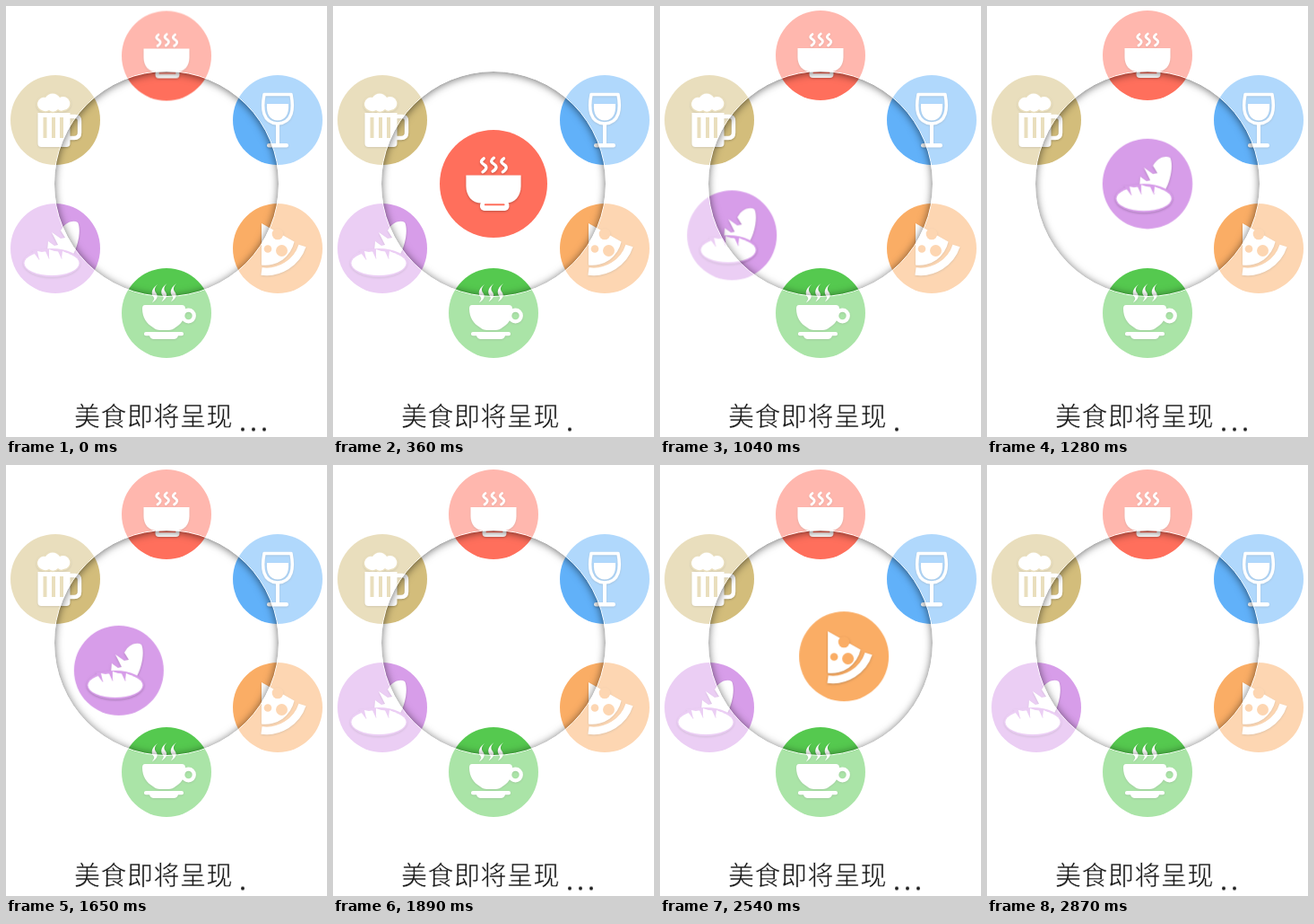
Write an HTML page that moves like this. It is 358 px wide and 480 px high and loops after 2.94 s.

```html
<!DOCTYPE html>
<html lang="zh-CN">
<head>
<meta charset="utf-8">
<title>Loading</title>
<style>
  html, body { margin: 0; width: 100%; height: 100%; overflow: hidden; background: #fff; }
  body { position: relative; }
  body > svg { position: absolute; left: 0; top: 0; }

  .plate { fill: currentColor; }
  .icon { fill: #fff; stroke: none; filter: drop-shadow(0 1px 1px rgba(0, 0, 0, .22)); }
  .cut { fill: currentColor; }
  .gap { stroke: currentColor; stroke-width: 3; paint-order: stroke; }
  .line { fill: none; stroke: #fff; stroke-linecap: round; stroke-linejoin: round; }

  /* home -> centre, swell, back home */
  .move { animation: visit 2940ms linear infinite; }
  @keyframes visit {
    0%, 30.85%, 100% { transform: translate(0, 0) scale(1); }
    10.2%, 16.8% { transform: translate(var(--dx), var(--dy)) scale(1); }
    12.2%, 14.9% { transform: translate(var(--dx), var(--dy)) scale(1.2); }
  }
  .soup { --dx: 0px; --dy: 143px; }
  .bread { --dx: 124px; --dy: -72px; animation-delay: 980ms; }
  .pizza { --dx: -124px; --dy: -72px; animation-delay: 1960ms; }

  /* the spread veils everything outside the ring */
  .ring {
    position: absolute; left: 53px; top: 72px; width: 252px; height: 252px;
    box-sizing: border-box; border: 1.5px solid #fff; border-radius: 50%;
    box-shadow: 0 0 0 400px rgba(255, 255, 255, .5), inset 0 1px 10px rgba(0, 0, 0, .58);
  }

  .label {
    font: 300 29px "Noto Sans CJK SC", "Noto Sans CJK", sans-serif;
    letter-spacing: .5px; fill: #1c1c1c; stroke: #fff; stroke-width: .5px;
  }

  /* a strip of dot rows slides past a window one row high */
  .strip { animation: count 2940ms infinite; }
  @keyframes count {
    0% { transform: translateY(0); animation-timing-function: steps(19, end); }
    97.5%, 100% { transform: translateY(-152px); }
  }
</style>
</head>
<body>
<svg width="358" height="480" viewBox="0 0 358 480">
  <g transform="translate(55 127)" color="#d3bd7b">
    <circle class="plate" r="50"/>
    <g class="icon">
      <path class="line" stroke-width="4.5" d="M15-4H22Q27-4 27 1V14Q27 20 21 20H15"/>
      <path d="M-19.5-8H16.5V26Q16.5 30 12.5 30H-15.5Q-19.5 30-19.5 26Z"/>
      <path class="cut" d="M-13.500-3h4v23h-4ZM-4-3h4v23h-4ZM5-3h4v23h-4Z"/>
      <path class="gap" d="M-14-10.500A7.200 7.200 0 0 1-11-25A9.500 9.500 0 0 1 5-25A7.500 7.500 0 1 1 9-11Q6-9 3-12Q-2-7-7-11Q-10-9-14-10.500Z"/>
    </g>
  </g>

  <g transform="translate(303 127)" color="#61b1f9">
    <circle class="plate" r="50"/>
    <g class="icon">
      <path class="line" stroke-width="3.500" d="M-15-28.500H15C18-13 17 3 0 4C-17 3-18-13-15-28.500Z"/>
      <path d="M-12-18H12C13-6 8 .5 0 .5C-8 .5-13-6-12-18Z"/>
      <rect x="-2" y="4" width="4" height="24"/>
      <rect x="-12" y="26" width="24" height="4.500" rx="2.200"/>
    </g>
  </g>

  <g transform="translate(179 342)" color="#55c94f">
    <circle class="plate" r="50"/>
    <g class="icon">
      <path id="wisp" d="M-10-32C-18-26-17-21-14.500-18C-13-16-14-15-16-11.500C-9-16-9.500-20-12-23C-14-26-13-29-10-32Z"/>
      <use href="#wisp" x="10.500" y="-1"/>
      <use href="#wisp" x="21" y="-1"/>
      <path d="M-24-9H17Q21-9 21-5C21 8 15 13 10 16Q7 19 2 19H-7Q-12 19-15 16C-22 12-27 5-27-5Q-27-9-24-9Z"/>
      <circle class="line" cx="24.500" cy="3" r="6.300" stroke-width="4.200"/>
      <rect x="-25" y="21" width="44" height="4.300" rx="2"/>
      <path d="M-19 25H13Q12 29 8 29H-14Q-18 29-19 25Z"/>
    </g>
  </g>

  <g transform="translate(55 270)" color="#d79de9">
    <g class="move bread">
      <circle class="plate" r="50"/>
      <g class="icon">
        <path d="M8-23C12-29 20-32 25-29C29-22 26-3 19 8L-9 3L-8-8L-1-3L3-4L-4-18L6-11L11-12L6-20Z"/>
        <ellipse class="cut" cx="-4" cy="16" rx="32" ry="16"/>
        <ellipse cx="-4" cy="16.500" rx="30.500" ry="13.500"/>
        <path class="cut" d="M-26 2L-18 13L-14 2ZM-12 1L-7 12L-2 1ZM2 1L7 12L13 3Z"/>
        <path d="M-18 12L-20 3L-10 5ZM-7 11L-7 1L2 4ZM7 11L8 3L15 6Z"/>
      </g>
    </g>
  </g>

  <g transform="translate(303 270)" color="#faad65">
    <g class="move pizza">
      <circle class="plate" r="50"/>
      <g class="icon">
        <path d="M-18-28L18.500-7.500A33 33 0 0 1-18 18.500Z"/>
        <path class="line" style="stroke-linecap:butt" stroke-width="8.500" d="M-18 25.500A42 42 0 0 0 27.500-3"/>
        <circle class="cut" cx="0" cy="-16" r="6.300"/>
        <circle class="cut" cx="-11" cy=".5" r="4.300"/>
        <circle class="cut" cx="4.500" cy="2.500" r="6.500"/>
      </g>
    </g>
  </g>

  <g transform="translate(179 55)" color="#ff6f5c">
    <g class="move soup">
      <circle class="plate" r="50"/>
      <g class="icon">
        <path id="steam" class="line" stroke-width="2.800" d="M-9-23.500C-13-20.500-11-19-8.500-17.500S-6-13.500-10-11"/>
        <use href="#steam" x="9.300" y="-.5"/>
        <use href="#steam" x="18.600"/>
        <path d="M-25.500-8H25.500V2C25.500 11 20 18 11 18H-11C-20 18-25.500 11-25.500 2Z"/>
        <rect x="-12.500" y="16" width="27" height="9" rx="4"/>
        <rect class="cut" x="-8.500" y="18.500" width="19" height="1.800" rx=".9"/>
      </g>
    </g>
  </g>
</svg>

<div class="ring"></div>

<svg width="358" height="480" viewBox="0 0 358 480">
  <defs>
    <!-- rows: three dots, none, one, two -->
    <pattern id="rows" width="32" height="32" patternUnits="userSpaceOnUse">
      <g fill="#1c1c1c">
        <circle cx="4" cy="4" r="2"/>
        <circle cx="16" cy="4" r="2"/>
        <circle cx="28" cy="4" r="2"/>
        <circle cx="4" cy="20" r="2"/>
        <circle cx="4" cy="28" r="2"/>
        <circle cx="16" cy="28" r="2"/>
      </g>
    </pattern>
  </defs>
  <text class="label" x="76" y="468">美食即将呈现</text>
  <svg x="260" y="467.500" width="32" height="8" overflow="hidden">
    <rect class="strip" width="32" height="160" fill="url(#rows)"/>
  </svg>
</svg>
</body>
</html>
```
